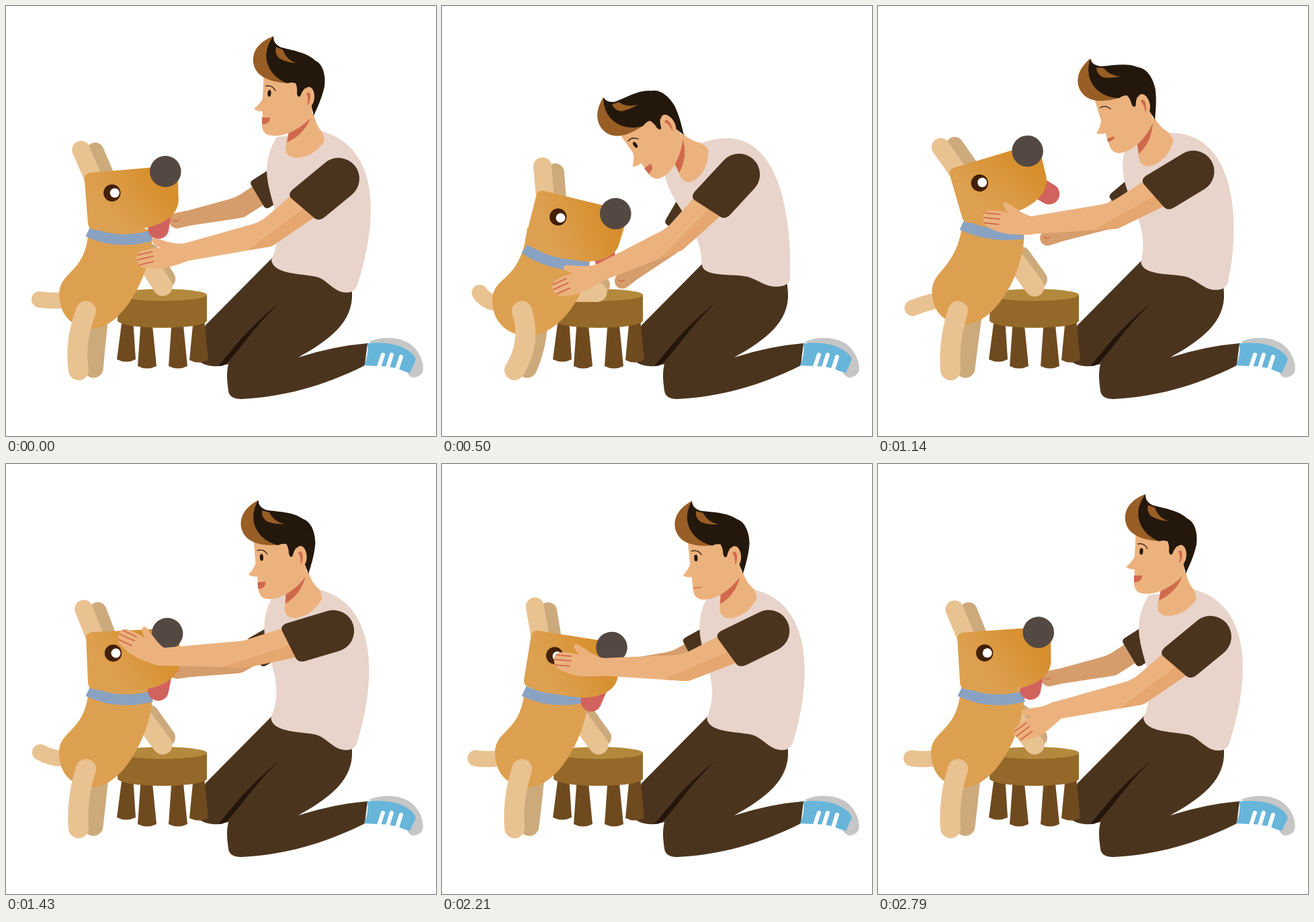
An HTML page with a canvas for the animation above (2.87 s loop, 640x640 px).

```html
<!DOCTYPE html>
<html lang="en">
<head>
<meta charset="utf-8">
<title>Petting the dog</title>
<style>
html, body { margin: 0; width: 100%; height: 100%; overflow: hidden; background: #fff; }
canvas { display: block; width: 100vw; height: 100vh; }
</style>
</head>
<body>
<canvas id="stage" width="640" height="640"></canvas>
<script>
const ctx = document.getElementById('stage').getContext('2d');
const LOOP = 2870, FPS = 14, LAST = 39;
const RAD = Math.PI / 180;

const C = {
  skin: '#ecb27e', skinShade: '#e5a66f', skinFar: '#d69d6c', red: '#d0694c',
  hair: '#24180c', hairLight: '#985e25', cloth: '#4b341e', fold: '#25160c', shirt: '#e8d4ca',
  dog: '#dda050', dogDeep: '#d78f2d', pale: '#e9c291', paleFar: '#cdaa7c',
  collar: '#8aa2c2', nose: '#544842', tongue: '#d2625d', eye: '#432006',
  seat: '#946828', seatTop: '#b3893d', stoolLeg: '#6f4a1f',
  shoe: '#68b5da', sole: '#c6c6c6'
};

// ---- poses: lean of the man, both wrists, and the dog's stance ----
const REST = { lean: 0, wristX: 265, wristY: 367, hand: -13, farX: 266, farY: 317,
  crouch: 0, stretch: 0, tilt: 1, tail: 0, smile: 1 };
const START = { ...REST, crouch: -0.1, tilt: 0 };
const BOW = { ...REST, lean: 33, wristX: 232, wristY: 398, hand: -24, farX: 278, farY: 402,
  crouch: 1, tilt: 18.6, tail: 30 };
const LICK = { ...REST, lean: 27, wristX: 223, hand: -17, farX: 262, farY: 376,
  stretch: 1, tilt: -25, tail: -42, smile: 0 };
const PAT = { ...REST, lean: 2.5, wristX: 230, wristY: 286, hand: 28, farY: 307, tilt: 1.6, tail: 13 };
const STROKE = { ...PAT, wristX: 240, wristY: 300, hand: -17, farX: 272, farY: 302, tilt: 7.7, tail: -10 };
const NUZZLE = { ...STROKE, lean: 3.2, wristX: 237, wristY: 302, hand: 5, tilt: 13.8, tail: 0, smile: 0 };
const RETURN = { ...REST, tilt: 10 };
const SETTLE = { ...REST, hand: -37 };

const TIMELINE = [[0, START], [7, BOW], [13, LICK], [19, PAT], [25, STROKE], [31, NUZZLE],
  [32.5, RETURN], [39, SETTLE], [40, START]];

const lerp = (a, b, u) => a + (b - a) * u;
const mix = (p, q, u) => p.map((v, i) => lerp(v, q[i], u));

function poseAt(step) {
  const i = TIMELINE.findLastIndex(([key]) => key <= step);
  const [[from, a], [to, b]] = [TIMELINE[i], TIMELINE[i + 1]];
  const t = (step - from) / (to - from), u = t * t * (3 - 2 * t);
  const pose = { step };
  for (const name in a) pose[name] = lerp(a[name], b[name], u);
  return pose;
}

// ---- geometry ----
const HIP = [458, 343];
const polar = (angle, r) => [r * Math.cos(angle * RAD), r * Math.sin(angle * RAD)];
const off = (p, d, k) => [p[0] + d[0] * k, p[1] + d[1] * k];
const normal = d => [d[1], -d[0]];
const heading = (a, b) => Math.atan2(b[1] - a[1], b[0] - a[0]) / RAD;
const unit = (a, b) => polar(heading(a, b), 1);

// Turns an upright point with the man's back.
function leaned(x, y, lean) {
  const [c, s] = polar(lean, 1), dx = x - HIP[0], dy = y - HIP[1];
  return [HIP[0] + dx * c + dy * s, HIP[1] - dx * s + dy * c];
}
// Elbow of a two-part arm that sags below the line to the wrist.
function elbowOf(shoulder, wrist, upper, fore) {
  const d = Math.min(Math.hypot(wrist[0] - shoulder[0], wrist[1] - shoulder[1]), upper + fore - 0.5);
  const along = (upper ** 2 - fore ** 2 + d ** 2) / (2 * d);
  const dir = unit(shoulder, wrist);
  return off(off(shoulder, dir, along), normal(dir), Math.sqrt(Math.max(0, upper ** 2 - along ** 2)));
}

// ---- drawing helpers ----
function shape(color, d) {
  ctx.fillStyle = color;
  ctx.fill(new Path2D(d));
}
function line(color, width, d, cap = 'round') {
  ctx.strokeStyle = color;
  ctx.lineWidth = width;
  ctx.lineCap = cap;
  ctx.stroke(new Path2D(d));
}
function oval(color, x, y, rx, ry = rx, tilt = 0) {
  ctx.fillStyle = color;
  ctx.beginPath();
  ctx.ellipse(x, y, rx, ry, tilt, 0, 7);
  ctx.fill();
}
function placed([x, y], degrees, draw) {
  ctx.save();
  ctx.translate(x, y);
  ctx.rotate(degrees * RAD);
  draw();
  ctx.restore();
}

function limb(color, cuff, elbow, wrist, [wc, we, ww], shade) {
  const n1 = normal(unit(cuff, elbow)), n2 = normal(unit(elbow, wrist));
  const ne = unit([0, 0], off(n1, n2, 1));
  const topEnd = off(wrist, n2, -ww), lowCuff = off(cuff, n1, wc);
  ctx.save();
  ctx.fillStyle = color;
  ctx.beginPath();
  ctx.moveTo(...off(cuff, n1, -wc));
  ctx.arcTo(...off(elbow, ne, -we), ...topEnd, 60);
  ctx.lineTo(...topEnd);
  ctx.lineTo(...off(wrist, n2, ww));
  ctx.arcTo(...off(elbow, ne, we), ...lowCuff, 16);
  ctx.lineTo(...lowCuff);
  ctx.fill();
  if (shade) {
    ctx.clip();
    ctx.fillStyle = shade;
    ctx.beginPath();
    ctx.moveTo(...off(mix(elbow, wrist, 0.25), n2, we * 0.85));
    ctx.lineTo(...off(cuff, n1, 4));
    ctx.lineTo(...off(cuff, n1, 60));
    ctx.lineTo(...off(elbow, ne, 60));
    ctx.fill();
  }
  ctx.restore();
}

// ---- man ----
function legs() {
  shape(C.cloth, 'M400 371L297 475Q286 500 289 530Q299 537 316 536L331 533C327 550 330 562 331 573Q333 585 350 585C412 582 472 566 534 535L538 502Q488 506 435 523C482 497 517 470 515 427L512 395Z');
  shape(C.fold, 'M407 441Q374 469 351 494Q333 515 316 536Q325 537 333 527Q345 513 352 504Q378 470 407 441Z');
  shape(C.sole, 'M540 500C560 490 590 493 604 505C618 517 623 535 620 545Q615 553 605 553Q598 550 596 543L600 528L560 508Z');
  shape(C.shoe, 'M538 502Q570 499 590 508Q607 516 610 526Q606 536 601 546Q592 544 586 541Q572 536 553 536L533 535Q540 520 538 502Z');
  line('#fff', 6, 'M561 519L555 537M574 519L568 538M588 522L582 541');
}

function shirt({ lean }) {
  const k = lean / 33;
  shape(C.shirt, `M${leaned(403, 195, lean)}
    C${360 - 20 * k} ${265 + 35 * k} ${428 - 43 * k} ${305 + 15 * k} ${395 - 8 * k} ${378 + 8 * k}
    C${398 - 8 * k} ${400 + 4 * k} ${440 - 7 * k} 398 ${462 - 7 * k} 403
    C${480 - 7 * k} 408 ${490 - 7 * k} ${430 - 9 * k} ${512 - 7 * k} ${426 - 9 * k}
    Q${520 - 4 * k} ${424 - 9 * k} ${523 - 5 * k} ${415 - 8 * k}
    C${548 - 28 * k} ${340 + 23 * k} ${566 - 46 * k} ${215 - 61 * k} ${leaned(472, 187, lean)}Z`);
}

function manHead({ step, lean, smile }) {
  const nod = Math.min(5, lean * 2);
  placed(leaned(458, 163, lean), -lean - nod, () => {
    ctx.translate(-458, -163);
    shape(C.skin, 'M421 186L416 210Q415 226 433 226Q456 225 473 203Q474 195 470 187Q461 177 458 160L440 160Z');
    shape(C.red, 'M453 167Q440 181 421 188L418 203Q443 192 453 167Z');
    shape(C.skin, 'M384 95L382 138Q377 147 369 153Q374 157 382 157L381 178Q382 192 396 193Q417 195 440 178L455 165L460 110Z');
    shape(C.hairLight, 'M398 45C376 53 366 68 368 84C371 104 390 113 420 115L425 95L400 65Z');
    shape(C.hair, 'M398 45Q397 55 408 61C425 66 448 69 460 81C473 87 476 105 474 120C470 138 463 152 458 163L455 150L445 122Q440 128 438 134Q434 137 433 130Q434 121 431 115Q425 113 419 115C395 107 374 77 398 45Z');
    shape(C.hairLight, 'M402 61Q399 71 407 78Q418 84 432 85Q417 80 412 65Z');
    oval(C.skin, 450, 136, 9, 15.5, 0.08);
    shape(C.red, 'M447 130Q453 126 453 136Q452 145 448 148Q451 138 447 130Z');
    line(C.hair, 1.3, 'M387 119Q396 117 401 126');
    const blinking = step >= 10 && step <= 16;
    if (!blinking) oval(C.hair, 392, 130, 2.6, 5, 0.08);
    if (smile > 0.15) {
      const drop = 166 + 10 * smile;
      shape(C.red, `M381 166H393Q393 ${drop} 381 ${drop}Z`);
    } else {
      line(C.red, 1.4, 'M382 174H393');
    }
  });
}

function farArm({ lean, farX, farY }) {
  const shoulder = leaned(418, 255, lean), wrist = [farX, farY];
  const elbow = off(mix(shoulder, wrist, 0.5), normal(unit(shoulder, wrist)), 15);
  const cuff = off(shoulder, unit(shoulder, elbow), 49), tip = off(wrist, unit(elbow, wrist), 12);
  limb(C.skinFar, cuff, elbow, wrist, [16, 16, 11]);
  line(C.skinFar, 23, `M${wrist}L${tip}`);
  line(C.red, 1.5, `M${tip[0] - 6} ${tip[1] - 1}q5 3 9 0`);
  placed(cuff, heading(shoulder, elbow), () =>
    shape(C.cloth, 'M-50 -24H-3Q4 -23 3 -16L2 18Q2 24 -4 24H-50Z'));
}

function nearArm({ lean, wristX, wristY, hand }) {
  const lift = Math.max(0, Math.min(1, (365 - wristY) / 65));
  const shoulder = off(leaned(495, 257, lean), [-4, -7], lift), wrist = [wristX, wristY];
  const elbow = elbowOf(shoulder, wrist, 136, 125);
  const cuff = off(shoulder, unit(shoulder, elbow), 58);
  limb(C.skin, cuff, elbow, wrist, [24, 20, 13], C.skinShade);
  oval(C.skin, ...wrist, 13);
  placed(wrist, hand, () => {
    shape(C.skin, 'M5 -13Q-8 -14 -20 -21Q-32 -28 -40 -31Q-46 -29 -41 -23Q-37 -17 -33 -15Q-50 -18 -64 -16Q-72 -13 -71 -4Q-70 5 -64 8Q-50 15 -32 16Q-12 16 5 13Z');
    line(C.red, 1.8, 'M-68 -12H-46M-70 -5H-46M-68 3H-47');
  });
  placed(shoulder, heading(shoulder, elbow) - 2, () =>
    shape(C.cloth, 'M0 31A31 31 0 0 1 0 -31L52 -31Q63 -31 65 -23L73 22Q74 30 64 31Z'));
}

// ---- stool and dog ----
function stool() {
  // x of the top left corner, foot shift, foot y
  for (const [x, shift, foot] of [[173, -8, 526], [201, -5, 536], [247, -5, 536], [279, -6, 527]]) {
    shape(C.stoolLeg, `M${x} 465h16L${x + shift + 28} ${foot}q-14 7 -28 0Z`);
  }
  shape(C.seat, 'M167 430H299V469Q292 478 233 479Q174 478 166 469Z');
  oval(C.seatTop, 233, 430, 66, 9);
}

function dogBody({ crouch: c, stretch: s, tail }) {
  const [dx, dy] = polar(tail, 46);
  line(C.pale, 24, `M${96 - dx} ${438 - dy + 12 * c}Q72 ${441 + 8 * c} 96 437`);
  line(C.paleFar, 29, `M${138 + 5 * c + 3 * s} 466Q${134 + 8 * c} 505 ${130 - 3 * c} 539`);
  const pawFrom = [205 - 10 * c, 380 + 46 * c], paw = [233 - 2 * c, 418 + 8 * c];
  line(C.paleFar, 28, `M${off(pawFrom, [8, -8], 1)}L${off(paw, [5, -11], 1)}`);
  line(C.pale, 29, `M${pawFrom}L${paw}`);
  const left = 79 - 4 * c + 3 * s, bottom = 481 + 10 * c - 14 * s, waist = 430 + 9 * c - 10 * s;
  shape(C.dog, `M${123 + 4 * c + 6 * s} ${336 - 6 * c - 27 * s}
    C${118 - 2 * s} ${400 + 14 * c - 15 * s} ${left} ${395 + 4 * c - 5 * s} ${left} ${waist}
    C${left} ${bottom - 19} 100 ${bottom} 128 ${bottom}
    C175 ${bottom} 216 ${400 + 28 * c - 5 * s} ${218 + 2 * c - s} ${345 + 35 * c - 5 * s}
    C217 ${325 - 55 * s} 175 ${325 - 35 * s} ${123 + 4 * c + 6 * s} ${336 - 6 * c - 27 * s}Z`);
  line(C.pale, 30, `M119 454Q${104.5 + 29 * c} 500 108 542`);
  line(C.collar, 16, `M${122 + c + 6 * s} ${338 + 23 * c - 25 * s}
    Q165 ${359 + 31 * c - 28 * s} ${217 + 2 * c - 2 * s} ${346 + 39 * c - 14 * s}`, 'butt');
}

function dogHead({ crouch, stretch, tilt }) {
  const reach = stretch + 0.35 * Math.max(0, crouch);
  placed([146 + 2 * crouch + 4 * stretch, 323 + 27 * crouch - 32 * stretch], tilt, () => {
    ctx.translate(12, -42);
    line(C.tongue, 31, `M75 16L${69 + 58 * reach} ${53 - 32 * reach}`);
    line(C.paleFar, 26, 'M-25 -62L-5 -15');
    line(C.pale, 27, 'M-46 -64L-26 -18');
    const coat = ctx.createLinearGradient(0, 30, 65, -25);
    coat.addColorStop(0, C.dog);
    coat.addColorStop(1, C.dogDeep);
    shape(coat, 'M-41 -20Q-42 -28 -33 -30L60 -38L98 -22L99 10C99 35 72 48 50 52Q7 58 -27 55Q-36 53 -36 44Z');
    oval(C.nose, 79.5, -32, 23.3);
    oval(C.eye, 0, 0, 12.7);
    oval('#fff', 4, 0, 7);
  });
}

function draw(ms) {
  const pose = poseAt(Math.min(LAST, Math.floor((ms % LOOP + 5) * FPS / 1000)));
  ctx.fillStyle = '#fff';
  ctx.fillRect(0, 0, 640, 640);
  legs();
  stool();
  for (const part of [farArm, shirt, manHead, dogBody, dogHead, nearArm]) part(pose);
}

function tick() {
  draw(performance.now());
  requestAnimationFrame(tick);
}
tick();
</script>
</body>
</html>
```
